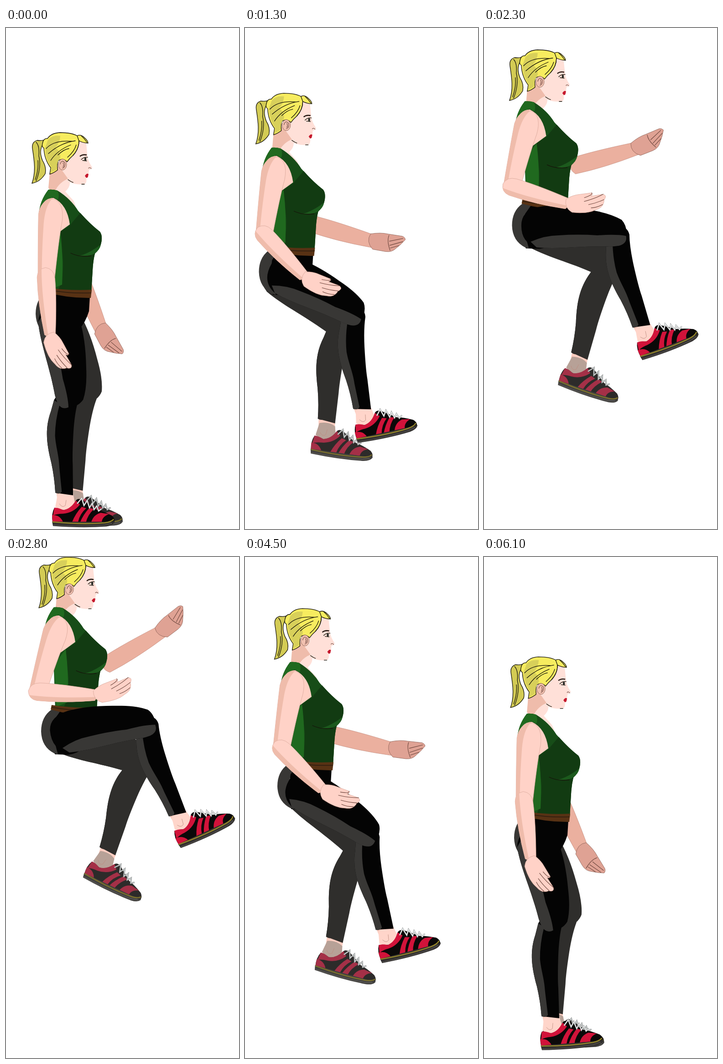
An HTML page that plays this animation: 511x1097 px, repeating every 6200 ms.

```html
<!DOCTYPE html>
<html lang="en">
<head>
<meta charset="utf-8">
<title>Step cycle</title>
<style>
html, body { margin: 0; height: 100%; overflow: hidden; background: #fff; }
svg { display: block; width: 100vw; height: 100vh; }
.near { --k: #040404; --g: #383735; --shoe: #0b0909; --r: #d1133a; --skin: #ffd5ca; --sole: #302e2d; --band: #93852a; --lace: #e6eaea; }
.far { --k: #2f2e2c; --g: #2f2e2c; --shoe: #2d2b2a; --r: #a43047; --skin: #b7a197; --sole: #41403e; --band: #7b702c; --lace: #c3c8c8; }
.ink { fill: none; stroke: #16140a; stroke-width: 1.3; stroke-linecap: round; }
.crease { fill: none; stroke: #6b453c; stroke-width: 1.1; stroke-linecap: round; }
.limb { fill: #ffd2c7; stroke: #d5a598; stroke-width: .7; }
.shade { fill: #efbcab; }
</style>
</head>
<body>
<svg viewBox="0 0 511 1097" preserveAspectRatio="none">
<defs>
  <g id="thigh">
    <path fill="var(--k)" d="M-44 10C-44 60-32 100-27 165Q-25 200-8 204Q20 206 34 190Q46 165 49 120Q55 60 47 15Q38-26 8-28Q-36-28-44 10Z"/>
    <path fill="var(--g)" d="M-33-4Q-16 26-13 56Q-6 100-5 140Q2 180 0 203Q-16 208-23 190Q-27 175-27 165C-32 100-44 60-44 10Z"/>
  </g>
  <g id="shin">
    <path fill="var(--k)" d="M-30 0Q-20-20 2-18Q22-16 22 4Q16 30 15 70Q14 120 16 140L19 207L-20 203Q-23 170-31 138C-42 100-49 65-36 25Z"/>
    <path fill="var(--g)" d="M-30 0L-17 8Q-26 45-25 78C-22 105-15 120-13 148L-6 200Q-10 207-20 203Q-23 170-31 138C-42 100-49 65-36 25Z"/>
  </g>
  <g id="shoe">
    <path fill="#ffcdc0" d="M-18-8L19-6L20 8L-16 8Z"/>
    <path fill="var(--skin)" d="M-15 0Q6-6 20 3L23 18Q12 35-6 35L-20 27Z"/>
    <path fill="none" stroke="#bd8d80" stroke-width=".8" d="M-11 20Q-5 30 2 24L4 12"/>
    <path fill="var(--shoe)" d="M-22 29Q-29 42-26 61L108 62Q113 54 104 46Q84 36 70 33L38 11Q28 7 24 15Q14 32-2 34Q-14 30-22 29Z"/>
    <g fill="var(--r)">
      <path d="M-22 29Q-14 28-3 34Q14 32 25 13L34 22Q20 40-3 42Q-16 42-25 46Z"/>
      <path d="M-27 45Q-10 44-3 60L-26 61Z"/>
      <path id="stripe" d="M38 27L48 30Q34 42 30 60L17 60Q24 42 38 27Z"/>
      <use href="#stripe" x="17" y="2"/>
      <path d="M59 60Q64 44 80 40L98 43Q83 48 82 60Z"/>
    </g>
    <path fill="var(--sole)" d="M-27 59L104 60Q112 55 110 61Q106 68 92 70Q40 74-25 69Z"/>
    <path fill="none" stroke="var(--band)" stroke-width="2.6" d="M-26 60Q40 66 88 62Q104 60 108 54"/>
    <path fill="none" stroke="#74716e" stroke-width="3" stroke-dasharray="1 2" d="M-23 67Q40 71 88 67L104 63"/>
    <path fill="none" stroke="#777" stroke-width="3" d="M28 20L38 8L43 24L50 13L55 29L61 19L65 33L71 25L75 36L82 31"/>
    <path fill="none" stroke="var(--lace)" stroke-width="2" d="M28 20L38 8L43 24L50 13L55 29L61 19L65 33L71 25L75 36L82 31"/>
  </g>
</defs>

<g id="farArm">
  <path fill="#ebb09f" stroke="#c38c7e" stroke-width=".7" d="M-18-4Q0-20 18 0Q20 50 14 140L-14 140Q-22 60-18-4Z"/>
  <g transform="translate(0 138) rotate(-20)">
    <path fill="#dfa294" stroke="#8f6459" stroke-width=".8" d="M16-2Q18 20 13 36L6 67Q3 73-2 73Q-12 63-19 52Q-28 42-25 28L-18 0Q0-14 16-2Z"/>
    <path class="crease" d="M10 38Q-2 32-23 38M1 68L-3 38M-6 67L-12 38M-14 58L-18 39"/>
  </g>
</g>
<g class="far">
  <use id="farShoe" href="#shoe"/>
  <use id="farShin" href="#shin"/>
  <use id="farThigh" href="#thigh"/>
</g>

<g id="head">
  <path fill="#ffe0d8" d="M96 314L94 350L104 366L128 374L154 392L148 378L130 358Q141 348 140 338Q156 344 171 342Q178 340 176 329Q182 327 181 320L182 311Q188 309 189 305Q181 293 179 283L176 253L158 246L120 290Z"/>
  <path class="shade" d="M96 316L93 350L104 366Q112 340 136 330L116 302Z"/>
  <path fill="#d3cb54" stroke="#16140a" stroke-width="1.3" d="M92 242Q80 248 68 246Q56 250 58 264C62 290 66 315 57 340Q75 337 86 319Q89 304 80 290Q72 270 80 256L92 252Z"/>
  <path class="ink" d="M66 250Q74 258 72 280Q78 305 66 335M70 290Q72 310 64 332"/>
  <path fill="#f7ec5f" stroke="#16140a" stroke-width="1.3" d="M80 253Q82 241 91 242Q99 230 118 229Q144 229 156 236Q164 232 172 240Q180 247 180 252Q170 252 160 247Q160 265 147 279Q139 286 134 293Q124 283 114 291Q112 300 113 311Q104 318 96 320L98 306Q84 288 83 263Q78 260 80 253Z"/>
  <path fill="#d8d05a" d="M92 245Q102 234 119 236Q118 252 108 262Q120 270 119 284Q110 296 111 310L98 317L99 304Q86 286 86 262Z"/>
  <path class="ink" d="M156 236L160 247M165 236Q172 242 178 251M88 264Q105 245 144 248M93 275Q120 251 152 247M98 290Q112 268 142 256M114 278Q126 266 138 264M135 283Q150 270 154 256M160 247Q160 265 147 279"/>
  <ellipse cx="124" cy="299" rx="9" ry="12" fill="#f2c1b1" stroke="#8c6455" stroke-width=".9"/>
  <path class="crease" d="M119 298Q122 287 129 295Q131 304 124 307M125 295Q128 300 125 304"/>
  <path fill="none" stroke="#20140f" stroke-width="2.4" d="M162 281Q168 276 177 278"/>
  <path class="ink" d="M165 288Q171 282 179 283M168 290L177 291"/>
  <ellipse cx="174" cy="287" rx="2.2" ry="3.5" fill="#282b27"/>
  <path class="crease" d="M181 307Q184 304 187 308"/>
  <path fill="#c5182d" d="M173 324Q177 317 181 320L180 324Q180 328 176 328Z"/>
  <path class="ink" d="M136 332Q143 337 147 338M166 342L172 342"/>
</g>

<g id="body">
  <path fill="#174d18" d="M93 354Q103 353 113 356Q142 374 158 400Q185 430 206 446Q213 456 208 474Q205 484 195 494Q191 510 190 530L187 580L96 576L93 490L72 408Q74 378 93 354Z"/>
  <path fill="#123b12" d="M163 405Q185 430 206 446Q213 456 208 474Q205 484 195 494Q191 510 190 530L187 580L112 576Q126 560 125 510L119 446L140 432Z"/>
  <path fill="#20691f" d="M93 354Q103 353 113 356Q118 366 114 376L102 370L72 408Q74 378 93 354ZM119 446Q126 500 123 562L98 572L93 480Z"/>
  <path fill="#1c5a1d" d="M160 499Q182 494 208 474Q206 486 194 494Q178 502 160 499Z"/>
  <path class="ink" d="M142 493Q160 502 186 499"/>
  <path fill="#ffd0c4" d="M74 402Q80 373 104 372Q134 386 140 430L118 446L84 470Z"/>
  <path class="shade" d="M74 402Q80 373 104 372Q92 384 90 400L84 440Z"/>
  <path fill="#040404" d="M92 580L184 588L182 620Q166 672 125 677L95 676Z"/>
  <path fill="#383735" d="M88 578Q65 594 65 626Q66 660 94 674L102 676Q88 630 94 600L108 580Z"/>
  <path fill="#583214" d="M88 568Q140 576 188 573L186 591Q135 592 86 578Z"/>
  <path fill="none" stroke="#352010" stroke-width="2" d="M88 573Q140 582 187 580"/>
</g>

<g class="near">
  <use id="nearShoe" href="#shoe"/>
  <use id="nearShin" href="#shin"/>
  <use id="nearThigh" href="#thigh"/>
</g>
<g id="upperArm">
  <path class="limb" d="M-28 10Q-26-22 2-26Q26-20 25 20Q21 60 19 145Q0 158-18 145Q-25 60-28 10Z"/>
  <path class="shade" d="M-28 10Q-26-20-2-25Q-15-8-15 30Q-14 100-9 150L-18 145Q-25 60-28 10Z"/>
</g>
<g id="foreArm">
  <path class="limb" d="M-20 0Q-18-18 0-20Q18-16 19 5Q20 50 12 127Q0 136-12 127Q-22 60-20 0Z"/>
  <path class="shade" d="M-20 0Q-19-12-9-18Q-13 40-4 130L-12 127Q-22 60-20 0Z"/>
  <g transform="translate(0 127) rotate(-29)">
    <path class="limb" d="M10 0Q16 16 14 32L12 58Q8 61 5 55L4 78Q3 86-2 86Q-6 85-9 81Q-13 81-18 77Q-25 72-26 60Q-32 40-21 7Q-8-8 10 0Z"/>
    <path class="crease" d="M12 58Q7 60 5 40M4 82Q-2 62-3 38M-8 81Q-12 64-12 46M-18 76Q-22 62-20 50"/>
  </g>
</g>
</svg>
<script>
// time, body x y, upper arm, forearm, far elbow x y, far forearm,
// near thigh, shin, foot, far hip shift, far thigh, shin, foot (degrees forward of straight down)
const poses = [
  [0, 0, 0, -4.7, 3.8, 156, 530, 22, 6.8, -2, 0, 0, 20, -7.7, -3],
  [600, -56, -22, -6.6, 22, 160, 536, 52, 42, -2.5, 6, -20, 42, -2, -1],
  [700, -53, -31, -7, 24.7, 163, 534, 55, 44.6, -1.6, 7, -20, 43, -2.5, -2],
  [1900, -16, -153, -11.9, 62, 198, 507, 93, 76, 10.3, 18, 0, 56.6, -16, -13],
  [2800, 12, -244, -17.3, 86.4, 210, 479, 121, 95, 18.3, 25, 0, 68.4, -22, -25],
  [3700, 9, -181, -12.2, 64, 198, 504, 99, 74, 15, 20.5, 0, 56.6, -18.3, -18.4],
  [4500, 6, -124, -10.5, 45, 182, 512, 76.5, 55, 9.5, 15, 0, 44, -15, -15],
  [6100, 1, -11, -5.1, 6.4, 157, 523, 24, 10.7, -.8, 5, 0, 21, -7.6, 0]
];
const LOOP = 6200, STEP = 100;
poses.push([LOOP, ...poses[0].slice(1)]);

const place = (id, [x, y], angle = 0) =>
  document.getElementById(id).setAttribute('transform', `translate(${x} ${y}) rotate(${-angle})`);

const along = ([x, y], angle, length) => {
  const a = angle * Math.PI / 180;
  return [x + length * Math.sin(a), y + length * Math.cos(a)];
};

function poseAt(t) {
  const i = poses.findIndex(p => p[0] > t), a = poses[i - 1], b = poses[i];
  const k = (t - a[0]) / (b[0] - a[0]);
  return a.map((v, j) => v + (b[j] - v) * k);
}

function leg(side, hip, thigh, shin, foot, shinLength) {
  const knee = along(hip, thigh, 188);
  place(side + 'Thigh', hip, thigh);
  place(side + 'Shin', knee, shin);
  place(side + 'Shoe', along(knee, shin, shinLength), foot);
}

function draw(t) {
  const [, x, y, upper, fore, ex, ey, farFore, thigh, shin, foot, shift, farThigh, farShin, farFoot] = poseAt(t);
  const sink = -.063 * y, shoulder = [x + 100, y + 400];
  place('body', [x, y]);
  place('head', [x + sink / 5, y + sink]);
  place('upperArm', shoulder, upper);
  place('foreArm', along(shoulder, upper, 145), fore);
  place('farArm', [x + ex, y + ey], farFore);
  leg('near', [x + 113, y + 629], thigh, shin, foot, 206);
  leg('far', [x + 113 + shift, y + 629], farThigh, farShin, farFoot, 211);
}

let start;
function tick(now) {
  start ??= now;
  draw(Math.floor((now - start) % LOOP / STEP) * STEP);
  requestAnimationFrame(tick);
}
draw(0);
requestAnimationFrame(tick);
</script>
</body>
</html>
```
